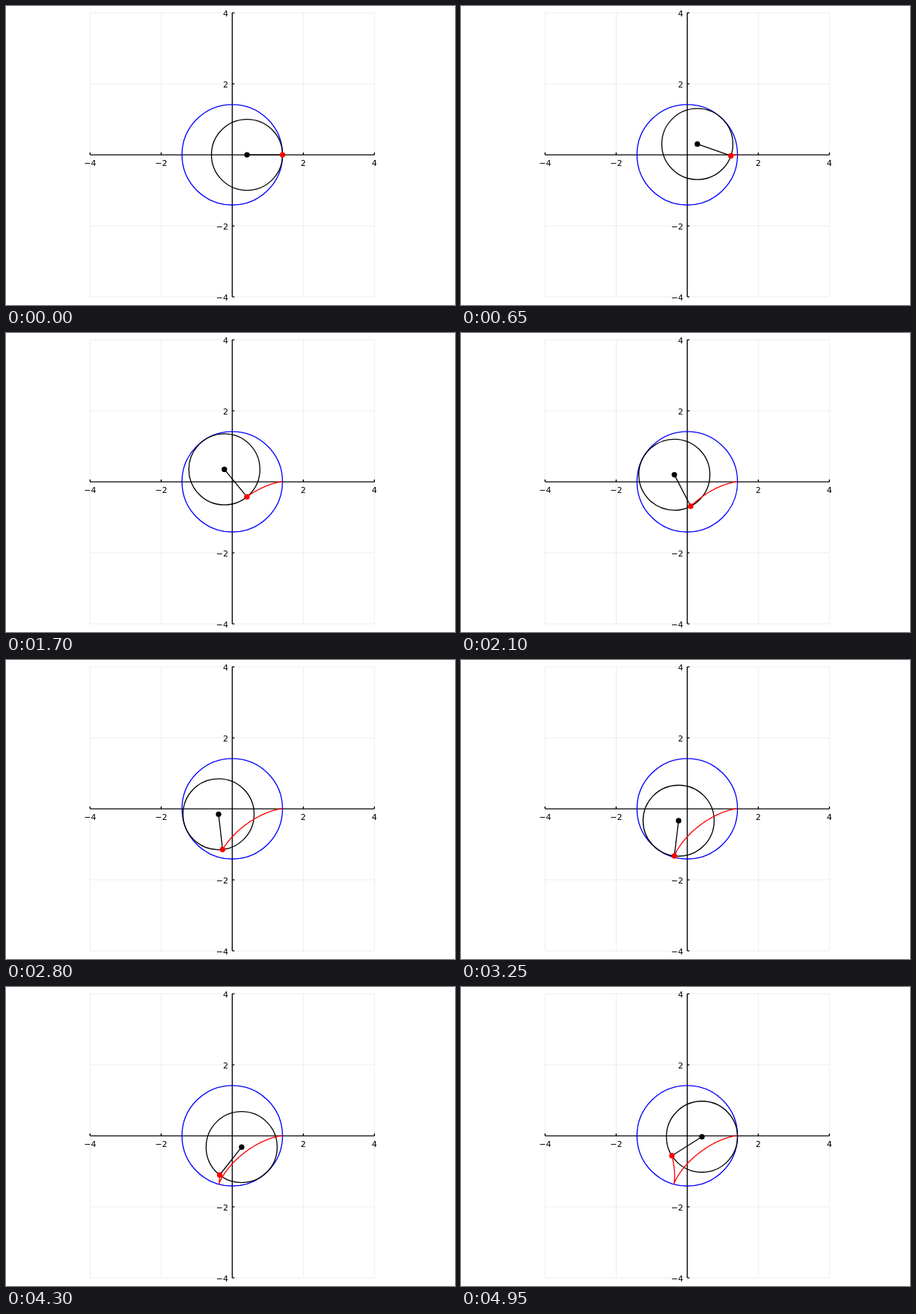
These frames come from a looping animation (600 px wide and 400 px high, 5 s). An HTML page:

```html
<!DOCTYPE html>
<html lang="en">
<head>
<meta charset="utf-8">
<title>Hypocycloid</title>
<style>
  html, body { margin: 0; width: 100%; height: 100%; overflow: hidden; background: #fff; }
  svg { display: block; width: 600px; height: 400px; }
  path, circle, line { fill: none; stroke: #000; stroke-width: 1.33; }
  .grid { stroke-opacity: .1; stroke-width: .75; }
  .dot { fill: #000; stroke: none; }
  text { font: 11px "DejaVu Sans", sans-serif; }
</style>
</head>
<body>
<svg viewBox="0 0 600 400">
  <path class="grid" id="grid"/>
  <path id="axes"/>
  <g id="labels"></g>
  <circle id="outer" style="stroke: #00f"/>
  <circle id="roller"/>
  <path id="trail" style="stroke: #f00; stroke-linejoin: round"/>
  <line id="arm"/>
  <circle class="dot" id="hub" r="3.65"/>
  <circle class="dot" id="pen" r="3.65" style="fill: #f00"/>
</svg>
<script>
  const CX = 302.35, CY = 199.05, UNIT = 47.5;
  const R = Math.SQRT2, D = R - 1;
  const STEPS = 100, STEP_MS = 50;
  const $ = id => document.getElementById(id);
  const px = x => CX + x * UNIT;
  const py = y => CY - y * UNIT;
  const set = (id, attrs) => {
    for (const key in attrs) $(id).setAttribute(key, attrs[key]);
  };

  function label(value, x, y, anchor) {
    const el = document.createElementNS("http://www.w3.org/2000/svg", "text");
    el.textContent = String(value).replace("-", "\u2212");
    el.setAttribute("x", x);
    el.setAttribute("y", y);
    el.setAttribute("text-anchor", anchor);
    $("labels").append(el);
  }

  function drawPlane() {
    const span = 8 * UNIT, left = px(-4), top = py(4);
    let grid = "", axes = `M${left} ${CY}h${span}M${CX} ${top}v${span}`;
    for (const v of [-4, -2, 2, 4]) {
      grid += `M${px(v)} ${top}v${span}M${left} ${py(v)}h${span}`;
      axes += `M${px(v)} ${CY}v-3M${CX} ${py(v)}h3`;
      label(v, px(v), 214, "middle");
      label(v, 297, py(v) + 4.7, "end");
    }
    set("grid", { d: grid });
    set("axes", { d: axes });
    set("outer", { cx: CX, cy: CY, r: R * UNIT });
  }

  // Unit circle rolling inside a circle of radius R
  function pose(k) {
    const a = 2 * Math.PI * k / STEPS;
    const x = D * Math.cos(a), y = D * Math.sin(a);
    return {
      hub: [px(x), py(y)],
      pen: [px(x + Math.cos(D * a)), py(y - Math.sin(D * a))]
    };
  }

  drawPlane();
  const poses = Array.from({ length: STEPS }, (_, k) => pose(k));
  const start = performance.now();
  let shown = -1;

  function show(k) {
    const { hub: [hx, hy], pen: [x, y] } = poses[k];
    set("roller", { cx: hx, cy: hy, r: UNIT });
    set("hub", { cx: hx, cy: hy });
    set("pen", { cx: x, cy: y });
    set("arm", { x1: hx, y1: hy, x2: x, y2: y });
    set("trail", { d: "M" + poses.slice(0, k + 1).map(p => p.pen.join(" ")).join("L") });
  }

  function tick() {
    const elapsed = Math.max(0, performance.now() - start);
    const k = Math.floor(elapsed / STEP_MS) % STEPS;
    if (k !== shown) show(shown = k);
    requestAnimationFrame(tick);
  }
  tick();
</script>
</body>
</html>
```
